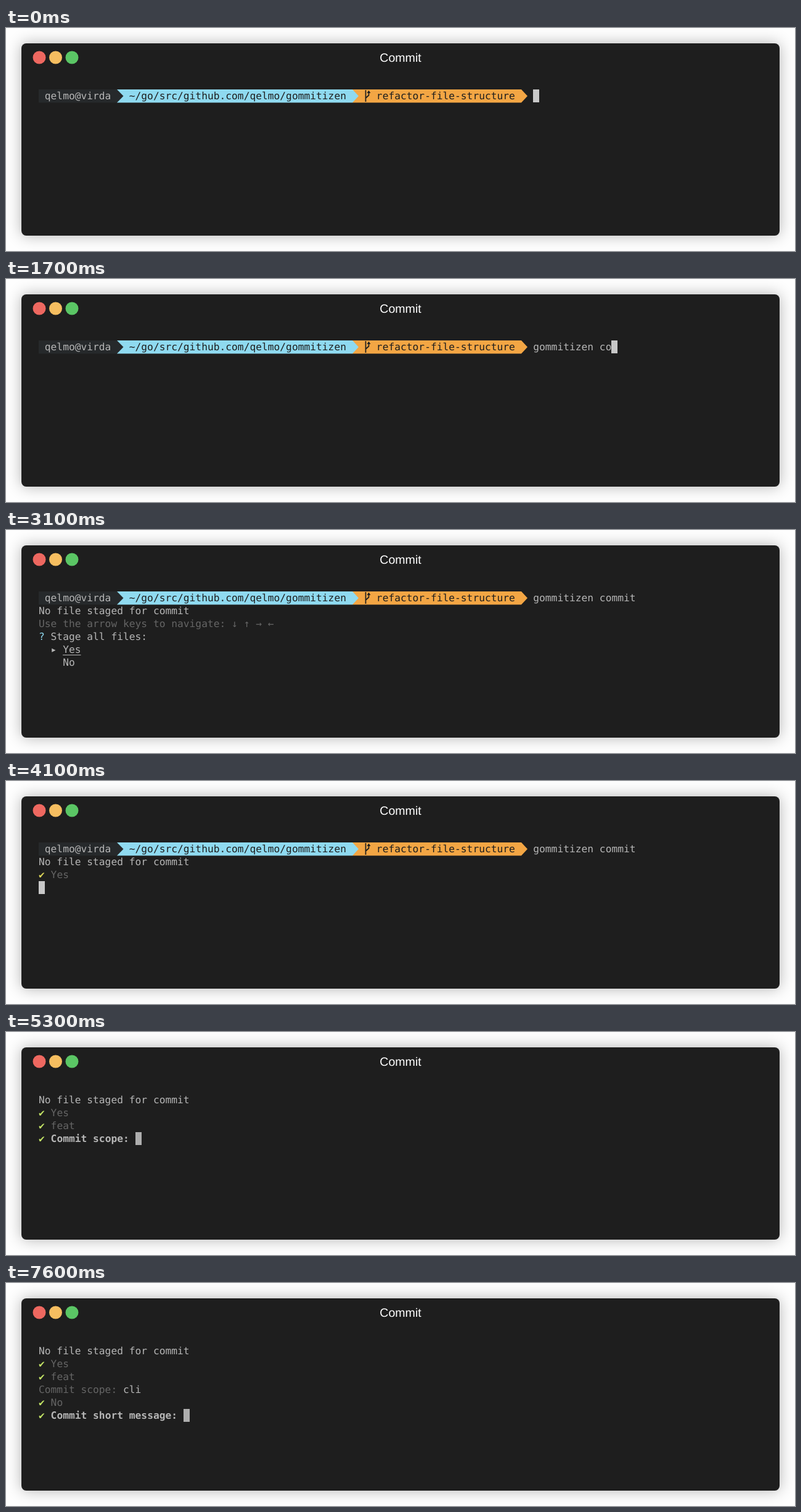
Write an HTML page that moves like this. It is 1280 px wide and 363 px high and loops after 8 s.

```html
<!DOCTYPE html>
<html lang="en">
<head>
<meta charset="utf-8">
<title>Commit</title>
<style>
  :root {
    --col: 9.783px;
    --row: 21px;
    --fg: #b6b6b6;
    --dim: #656565;
    --blue: #8fdaf0;
    --orange: #f3a644;
  }
  html, body { margin: 0; width: 100%; height: 100%; overflow: hidden; }
  body { position: relative; background: #fefefe; }

  .window {
    position: absolute; left: 25px; top: 25px; width: 1230px; height: 313px;
    border-radius: 8px; background: #1e1e1e;
    box-shadow: 0 0 25px rgba(0, 0, 0, .3);
  }
  .art { position: absolute; left: 0; top: 0; }
  .title {
    position: absolute; left: 0; top: 37px; width: 1280px;
    font: 19.6px/24px "Liberation Sans", Arial, sans-serif;
    text-align: center; color: #fff; text-rendering: geometricPrecision;
  }

  .term {
    position: absolute; left: 53px; top: 100px; width: 1190px; height: 231px;
    overflow: hidden; color: var(--fg);
    font: 16.25px/21px "DejaVu Sans Mono", monospace;
    text-rendering: geometricPrecision; font-variant-ligatures: none;
  }
  pre { margin: 0; height: 231px; font: inherit; }
  .dim { color: var(--dim); }
  .ask { color: var(--blue); }
  .ok { color: #c3e566; }
  .yellow { color: #dcd558; }
  u { text-decoration-thickness: 1.3px; text-underline-offset: 3px; text-decoration-skip-ink: none; }
  .dark { color: #1e1e1e; }

  .prompt { animation: prompt 8s step-end infinite; }
  .line { position: absolute; left: 53px; top: 100px; height: var(--row); }
  .typed { display: inline-block; vertical-align: top; }
  .command { animation: command 8s infinite; }
  .scope { animation: scope 8s infinite; }
  .strip { animation: strip 8s step-end infinite; }
  .cursor {
    position: absolute; left: 0; top: 0; width: 10px; height: var(--row);
    animation: cursor 8s step-end infinite;
  }

  @keyframes prompt { 0% { opacity: 1 } 57.5%, 100% { opacity: 0 } }

  /* one panel per screen state */
  @keyframes strip {
    0% { transform: translateY(0) }
    38.75% { transform: translateY(-231px) }
    51.25% { transform: translateY(-462px) }
    57.5% { transform: translateY(-693px) }
    66.25% { transform: translateY(-924px) }
    86.25% { transform: translateY(-1155px) }
    95%, 100% { transform: translateY(-1386px) }
  }

  /* one character every 100 ms */
  @keyframes command {
    0%, 4.99% { clip-path: inset(0 100% 0 0); animation-timing-function: steps(17) }
    26.24%, 100% { clip-path: inset(0 0 0 0) }
  }
  @keyframes scope {
    0%, 73.74% { clip-path: inset(0 100% 0 0); animation-timing-function: steps(3) }
    77.49%, 100% { clip-path: inset(0 0 0 0) }
  }
  @keyframes cursor {
    0% { left: calc(82 * var(--col)); top: 0; opacity: 1; background: #c8c8c8 }
    4.99% { left: calc(82 * var(--col)); top: 0; opacity: 1; background: #c8c8c8; animation-timing-function: steps(17) }
    26.24% { left: calc(99 * var(--col)); top: 0; opacity: 1; background: #c8c8c8 }
    32.5% { left: 0; top: var(--row); opacity: 1; background: #c8c8c8 }
    38.75% { left: 0; top: var(--row); opacity: 0; background: #c8c8c8 }
    51.25% { left: 0; top: calc(3 * var(--row)); opacity: 1; background: #c8c8c8 }
    57.5% { left: 0; top: calc(3 * var(--row)); opacity: 0; background: #aeaeae }
    66.25% { left: calc(16 * var(--col)); top: calc(3 * var(--row)); opacity: 1; background: #aeaeae }
    73.74% { left: calc(16 * var(--col)); top: calc(3 * var(--row)); opacity: 1; background: #aeaeae; animation-timing-function: steps(3) }
    77.49% { left: calc(19 * var(--col)); top: calc(3 * var(--row)); opacity: 1; background: #aeaeae }
    86.25% { left: calc(19 * var(--col)); top: calc(3 * var(--row)); opacity: 0; background: #aeaeae }
    95%, 100% { left: calc(24 * var(--col)); top: calc(5 * var(--row)); opacity: 1; background: #aeaeae }
  }
</style>
</head>
<body>
<div class="window"></div>
<svg class="art" width="1280" height="363">
  <circle cx="54" cy="48" r="10.5" fill="#ee6860"/>
  <circle cx="80.5" cy="48" r="10.5" fill="#f6be60"/>
  <circle cx="107" cy="48" r="10.5" fill="#5bc665"/>
  <g class="prompt">
    <path d="M562 100H836L846 110.75 836 121.5H562z" fill="#f3a644"/>
    <path d="M180 100H562L572 110.75 562 121.5H180z" fill="#8fdaf0"/>
    <path d="M53 100H180L190.5 110.75 180 121.5H53z" fill="#26292b"/>
    <path d="M583.5 101V120M583.5 115.5V114L588.5 109.5V104" fill="none" stroke="#1e1e1e" stroke-width="1.7"/>
    <path d="M585.5 106L588.5 101.5 591.5 106z" fill="#1e1e1e"/>
  </g>
</svg>
<div class="title">Commit</div>

<div class="term">
  <div class="strip">
<pre></pre>
<pre>&#32;
No file staged for commit
<span class="dim">Use the arrow keys to navigate: ↓ ↑ → ←</span>
<span class="ask">?</span> Stage all files:
  ▸ <u>Yes</u>
    No</pre>
<pre>&#32;
No file staged for commit
<span class="yellow">✔</span> <span class="dim">Yes</span></pre>
<pre>No file staged for commit
<span class="yellow">✔</span> <span class="dim">Yes</span>
<span class="dim">Use the arrow keys to navigate: ↓ ↑ → ←</span>
<span class="ask">?</span> Commit type:
  ▸ <u>feat</u>
    fix
    build
    chore
↓   ci</pre>
<pre>No file staged for commit
<span class="ok">✔</span> <span class="dim">Yes</span>
<span class="ok">✔</span> <span class="dim">feat</span>
<span class="ok">✔</span> <b>Commit scope:</b> <span class="typed scope">cli</span></pre>
<pre>No file staged for commit
<span class="ok">✔</span> <span class="dim">Yes</span>
<span class="ok">✔</span> <span class="dim">feat</span>
<span class="dim">Commit scope:</span> cli
<span class="dim">Use the arrow keys to navigate: ↓ ↑ → ←</span>
<span class="ask">?</span> Is this a breaking change:
  ▸ <u>No</u>
    Yes</pre>
<pre>No file staged for commit
<span class="ok">✔</span> <span class="dim">Yes</span>
<span class="ok">✔</span> <span class="dim">feat</span>
<span class="dim">Commit scope:</span> cli
<span class="ok">✔</span> <span class="dim">No</span>
<span class="ok">✔</span> <b>Commit short message:</b></pre>
  </div>
  <pre class="prompt" style="position:absolute;left:0;top:0"> qelmo@virda   <span class="dark">~/go/src/github.com/qelmo/gommitizen     refactor-file-structure</span>   <span class="typed command">gommitizen commit</span></pre>
  <div class="cursor"></div>
</div>
</body>
</html>
```
